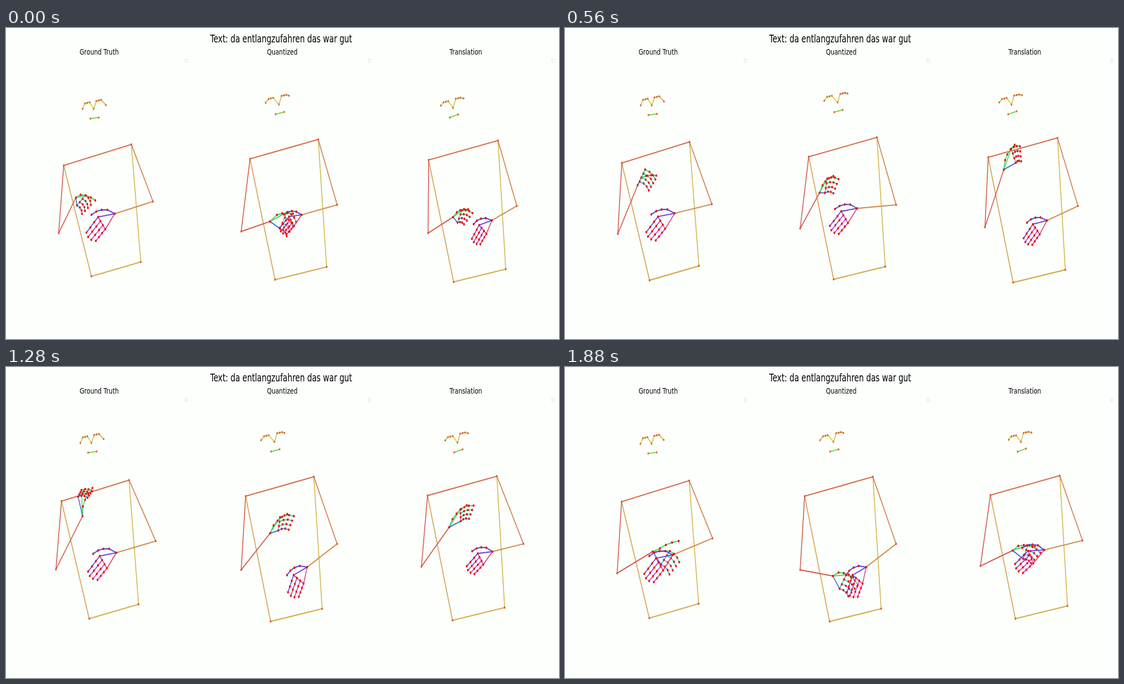
Recreate the animation shown at these times as an HTML page. Size 997x561 px, loop 1.92 s.

```html
<!DOCTYPE html>
<html lang="en">
<head>
<meta charset="utf-8">
<title>Pose comparison</title>
<style>
html, body { margin: 0; width: 100%; height: 100%; overflow: hidden; background: #fcfffc }
svg { display: block; width: 997px; height: 561px; fill: none; stroke-linecap: round; stroke-linejoin: round }
text { font: 14.8px "DejaVu Sans", sans-serif; fill: #000; text-anchor: middle }
.head { font-size: 18.8px }
</style>
</head>
<body>
<!-- The figure is drawn wide and squeezed to the stage as a whole. -->
<svg viewBox="0 0 1365.75 561" preserveAspectRatio="none">
  <g id="labels"><text class="head" x="679.5" y="26.5">Text: da entlangzufahren das war gut</text></g>
  <g id="poses"></g>
</svg>
<script>
const SQUEEZE = 0.73, LOOP = 1920, STEP = 40;
const times = [0, 360, 720, 960, 1280, 1440, 1880];
const labels = document.getElementById('labels'), poses = document.getElementById('poses');

// rest: shoulders, elbows, hips.  nose, brows: face at rest, outer brow ends from the nose
// sway: shoulder x, shoulder y, hip y, left elbow y, elbow spread, right elbow y, head x
// right: wrist, index knuckle, pinky knuckle, index tip, optional thumb tip
// left: wrist, optional turn in degrees and size
// A track that ends early keeps its last pose.
const truth = {
  name: 'Ground Truth', x: 168, tilt: 2, lift: 1.5, pinky: 0.9, bend: 2.5,
  rest: [104,248, 226,210, 95,370, 265,313, 154,448, 243,422],
  nose: [158,146], brows: [-20,0, 22,-7],
  sway: [[0,-3,4,1,0,4], [-3,-5,9,1,0,5], [-4,-4,8,-4,2,5], [-4,-6,6,-5,5,1], [-4,-9,4,1,6,-4], [-2,-5,5,2,1,-4]],
  left: [[196,335], [197,334], [198,335], [198,338], [199,335], [198,331], [194,339]]
};
truth.right = [
  [126,306, 143,302, 128,320, 153,319, 161,311],
  [130,286, 149,273, 137,297, 163,297, 168,276],
  [132,281, 140,241, 131,259, 161,251, 161,256],
  [136,264, 137,220, 126,231, 155,214, 159,215],
  [138,269, 136,222, 130,234, 155,224, 156,218],
  [149,307, 179,306, 166,328, 198,338, 195,299],
  [158,333, 189,332, 173,356, 206,352, 205,314]
];

const quantized = {
  name: 'Quantized', x: 498, tilt: 4, lift: 1, pinky: 0.75, bend: 2.5,
  rest: [440,236, 563,201, 424,367, 597,319, 485,454, 578,431],
  nose: [492,138], brows: [-24,-3, 18,-16],
  sway: [[0,-4,1,-2], [-2,-3,-1,-7], [-8,-3,5,-1]],
  left: [[533,337,3,0.75], [527,333,-1,0.93], [529,325,0,0.95], [543,361,-19,0.93]]
};
quantized.right = [
  [476,349, 507,332, 494,362, 523,350],
  [469,323, 490,305, 483,333, 512,315],
  [454,279, 464,247, 462,271, 483,241],
  [471,277, 486,242, 487,265, 508,231],
  [476,300, 494,271, 491,295, 519,269],
  [481,349, 505,342, 494,366, 523,359],
  [483,377, 507,375, 495,400, 528,393]
];

const translation = {
  name: 'Translation', x: 829, tilt: 5.5, lift: 1.25, pinky: 0.62, bend: 2,
  rest: [762,238, 887,203, 761,370, 921,321, 807,458, 901,435],
  nose: [806,144], brows: [-22,-4, 19,-17],
  sway: [[1,-3,1,-4,3,0,-2], [0,-6,1,-15,5,0,0], [-6,-8,1,-11,10,-1,12],
    [-2,-6,-1,-10,12,-2,10], [2,-5,-5,-11,11,-4,11], [5,-7,-4,-11,12,-8,11]],
  left: [[876,347,-9,0.8], [871,351,-4,0.86], [870,344,-3,0.86], [884,346,2,0.85],
    [877,333,4,0.87], [872,333,-4,0.94], [864,330,8,0.95]]
};
translation.right = [
  [806,341, 822,329, 814,351, 841,334],
  [802,289, 821,258, 826,285, 840,257],
  [784,237, 793,196, 803,219, 806,188],
  [793,258, 802,216, 817,237, 817,199],
  [799,289, 819,257, 820,278, 843,250],
  [802,316, 822,296, 822,321, 847,298],
  [807,331, 834,322, 826,346, 857,335]
];

// Resting left hand, from the wrist: thumb base and tip, knuckles, finger tips
const leftHand = [[-13,-7], [-42,2], [-30,6], [-17,28], [-51,34], [-34,49]];

const panels = [truth, quantized, translation];
for (const p of panels) {
  p.sway.unshift(p.sway[0].map(() => 0));
  labels.innerHTML += `<text x="${p.x / SQUEEZE}" y="47.7">${p.name}</text>
    <rect x="${(p.x + 155) / SQUEEZE}" y="56.5" width="5.6" height="5.6" rx="1" stroke="#ddd"/>`;
}

// Smooth (cubic Hermite) value of every number in a track at time t
function at(rows, t) {
  let i = 0;
  while (i < 5 && t >= times[i + 1]) i++;
  const row = k => rows[Math.min(k, rows.length - 1)];
  const span = times[i + 1] - times[i], u = Math.min(1, (t - times[i]) / span);
  const slope = (k, j) => {
    const a = Math.max(0, k - 1), b = Math.min(6, k + 1);
    return (row(b)[j] - row(a)[j]) / (times[b] - times[a]) * span;
  };
  return row(i).map((p, j) => {
    const q = row(i + 1)[j], m = slope(i, j), n = slope(i + 1, j);
    return p + u * (m + u * (3 * (q - p) - 2 * m - n + u * (2 * (p - q) + m + n)));
  });
}

const pairs = row => Array.from({ length: row.length >> 1 }, (_, i) => [row[2 * i], row[2 * i + 1]]);
const xy = p => (p[0] / SQUEEZE).toFixed(1) + ' ' + p[1].toFixed(1);
const line = (hue, ...pts) =>
  `<path d="M${pts.map(xy).join('L')}" stroke="hsl(${hue} 62% 56%)" stroke-width="2.1"/>`;
const dots = (pts, color, size) =>
  `<path d="${pts.map(p => `M${xy(p)}h0`).join('')}" stroke="${color}" stroke-width="${size}"/>`;

// Point at fraction f from a to b, pushed sideways by bow
function between(a, b, f, bow = 0) {
  const dx = b[0] - a[0], dy = b[1] - a[1], len = Math.hypot(dx, dy) || 1;
  return [a[0] + dx * f + bow * dy / len, a[1] + dy * f - bow * dx / len];
}
const chain = (a, b, bow) => [a, between(a, b, 1 / 3, bow), between(a, b, 2 / 3, bow), b];

function drawHand(wrist, [base, tip, index, pinky, indexTip, pinkyTip], thumbBend, bend, bow, hues) {
  const fingers = [0, 1, 2, 3].map(i =>
    chain(between(index, pinky, i / 3), between(indexTip, pinkyTip, i / 3, i % 3 ? bow : 0), bend));
  const thumb = chain(base, tip, thumbBend);
  let out = line(hues[0], wrist, ...thumb) + line(hues[1], wrist, index);
  fingers.forEach((f, i) => {
    out += line(hues[i + 1], ...f);
    if (i) out += line(hues[i + 1], fingers[i - 1][0], f[0]);
  });
  return out + line(hues[5], wrist, pinky) + dots([wrist, ...thumb, ...fingers.flat()], '#e80c10', 4.6);
}

function drawRight(p, row) {
  const [wrist, index, pinky, indexTip, thumbTip] = pairs(row);
  const mix = f => [0, 1].map(f);
  const base = mix(k => wrist[k] + 0.53 * (index[k] - wrist[k]) - 0.22 * (pinky[k] - wrist[k]));
  const tip = thumbTip || mix(k => (index[k] + indexTip[k]) / 2 + 0.2 * (index[k] - pinky[k]));
  const pinkyTip = mix(k => pinky[k] + p.pinky * (indexTip[k] - index[k]));
  return drawHand(wrist, [base, tip, index, pinky, indexTip, pinkyTip], 2, p.bend, 0,
    [120, 138, 160, 174, 198, 226]);
}

function drawLeft([x, y, turn = 0, size = 1]) {
  const a = turn * Math.PI / 180, c = size * Math.cos(a), s = size * Math.sin(a);
  const pts = leftHand.map(([u, v]) => [x + u * c - v * s, y + u * s + v * c]);
  return drawHand([x, y], pts, -3, 0, -4 * size, [240, 254, 280, 300, 318, 342]);
}

function drawFace([x, y], [lx, ly, rx, ry], tilt) {
  const p = (dx, dy) => [x + dx, y + dy];
  const left = [p(lx, ly), ...[0, 1, 2].map(i => p(lx * 0.78 + i * 4.2, -10 - i))];
  const right = [...[0, 1, 2].map(i => p(4.8 + i * 4.4, -13 - tilt * 0.6 - i)), p(rx, ry)];
  const nose = p(0, 0), mouth = [p(-6, 17.5), p(9.3, 17.5 - tilt)];
  return line(82, left[0], left[1]) + line(70, ...left.slice(1)) + line(58, left[3], nose) +
    line(50, nose, right[0]) + line(42, ...right) + line(97, ...mouth) +
    dots([...left, nose, ...right, ...mouth], '#dc6a30', 4);
}

function drawBody([ls, rs, le, re, lh, rh], lw, rw) {
  return line(36, ls, lh) + line(46, rs, rh) + line(41, lh, rh) + line(14, ls, rs) +
    line(6, ls, le) + line(5, le, lw) + line(22, rs, re) + line(29, re, rw) +
    dots([ls, rs, le, re, lh, rh], '#df5230', 4.2);
}

function drawPose(p, t) {
  const [sx, sy, hipY, leftY, spread = 0, rightY = 0, headX = 0] = at(p.sway, t);
  const right = at(p.right, t), left = at(p.left, t);
  const moves = [[sx, sy], [sx, sy], [-spread, leftY], [spread, rightY], [sx, hipY], [sx, hipY]];
  const body = pairs(p.rest).map(([x, y], i) => [x + moves[i][0], y + moves[i][1]]);
  const nose = [p.nose[0] + sx + headX, p.nose[1] + sy * p.lift];
  return drawBody(body, right, left) + drawFace(nose, p.brows, p.tilt) + drawRight(p, right) + drawLeft(left);
}

let shown = -1;
function frame(now) {
  const t = Math.floor(Math.max(0, now) % LOOP / STEP) * STEP;
  if (t !== shown) {
    shown = t;
    poses.innerHTML = panels.map(p => drawPose(p, t)).join('');
  }
  requestAnimationFrame(now => frame(now - start));
}
const start = performance.now();
frame(0);
</script>
</body>
</html>
```
